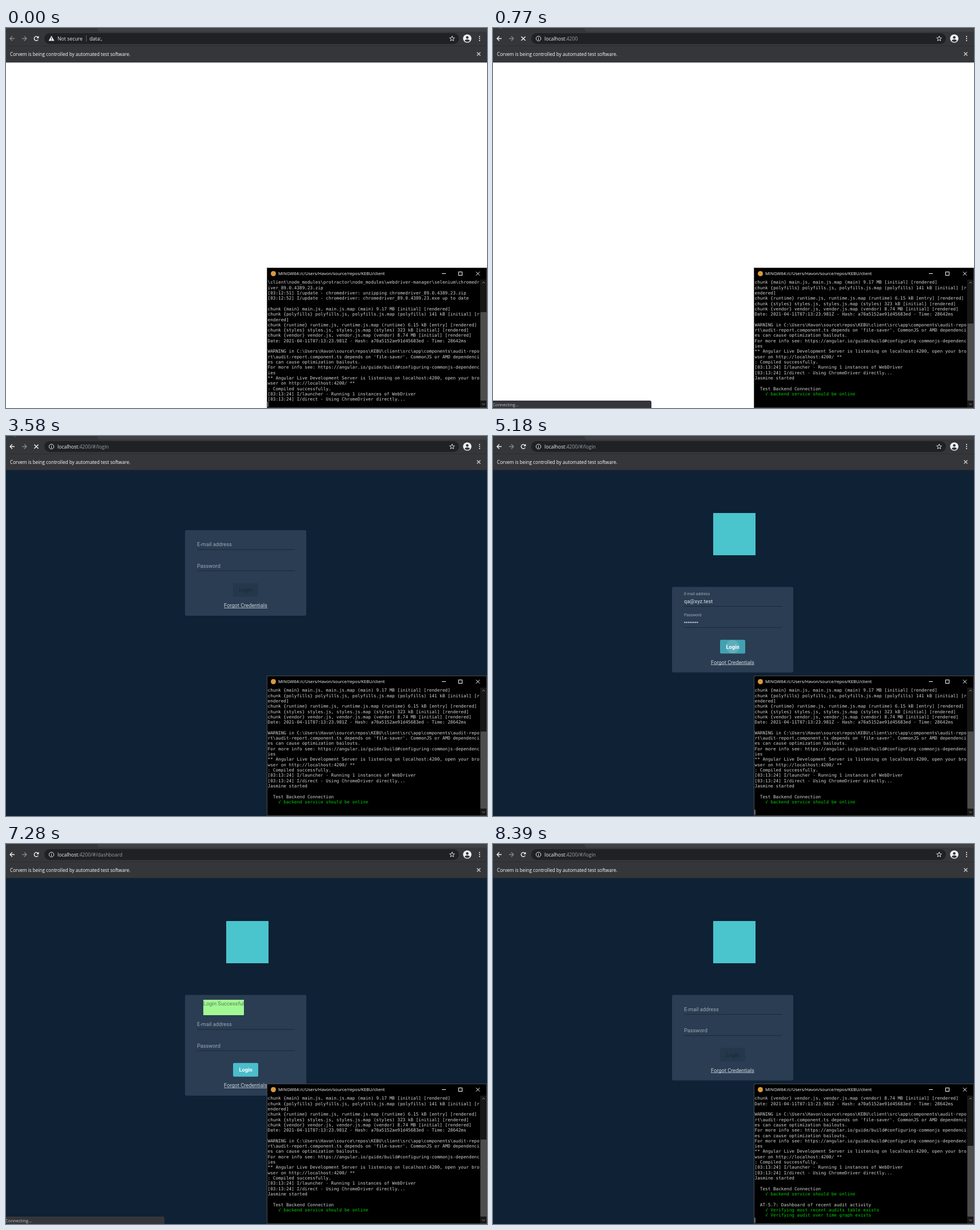
An HTML page with a canvas that plays this animation: 841 by 666 pixels, repeating every 8420 ms.

```html
<!DOCTYPE html>
<html lang="en">
<head>
<meta charset="utf-8">
<title>Automated login test</title>
<style>
html, body { margin: 0; width: 100%; height: 100%; overflow: hidden; background: #fff; }
canvas { display: block; width: 841px; height: 666px; }
</style>
</head>
<body>
<canvas id="stage"></canvas>
<script>
const W = 841, H = 666, LOOP = 8420;
const SANS = '"Open Sans", sans-serif';
const ROBOTO = 'Roboto, sans-serif';
const MONO = '"DejaVu Sans Mono", monospace';
const NAVY = '#0f2135', SLATE = '#2a3d52', BAR = '#35363a', TEAL = '#4bbdcb';

const canvas = document.getElementById('stage');
const dpr = window.devicePixelRatio || 1;
canvas.width = W * dpr;
canvas.height = H * dpr;
const c = canvas.getContext('2d');

const clamp = v => Math.max(0, Math.min(1, v));
const ease = v => { v = clamp(v); return v * v * (3 - 2 * v); };
const ramp = (t, a, b) => clamp((t - a) / (b - a));
const within = (t, ...spans) => spans.some(([a, b]) => t >= a && t < b);

function rect(x, y, w, h, color) {
  c.fillStyle = color;
  c.fillRect(x, y, w, h);
}

function round(x, y, w, h, r, color) {
  c.fillStyle = color;
  c.beginPath();
  c.roundRect(x, y, w, h, r);
  c.fill();
}

function disc(x, y, r, color) {
  c.fillStyle = color;
  c.beginPath();
  c.arc(x, y, r, 0, Math.PI * 2);
  c.fill();
}

// Draws polylines given as [x, y, x, y, ...]
function stroke(color, width, ...lines) {
  c.strokeStyle = color;
  c.lineWidth = width;
  c.beginPath();
  for (const p of lines) {
    c.moveTo(p[0], p[1]);
    for (let i = 2; i < p.length; i += 2) c.lineTo(p[i], p[i + 1]);
  }
  c.stroke();
}

// y is the middle of the capitals
function text(s, x, y, size, color, font = ROBOTO, weight = 400, align = 'left') {
  c.font = `${weight} ${size}px ${font}`;
  c.textAlign = align;
  c.fillStyle = color;
  c.fillText(s, x, y + size * 0.36);
  return c.measureText(s).width;
}

function cross(x, y, r, color, width) {
  stroke(color, width, [x - r, y - r, x + r, y + r], [x + r, y - r, x - r, y + r]);
}

function arrow(x, dir, color) {
  const tip = x + 4 * dir;
  stroke(color, 1.3, [x - 4 * dir, 18.5, tip, 18.5], [x, 14.5, tip, 18.5, x, 22.5]);
}

/* ---------- browser frame ---------- */

function reloadIcon() {
  c.strokeStyle = '#f1f1f1';
  c.lineWidth = 1.4;
  c.beginPath();
  c.arc(53, 18.5, 3.7, 0.5, Math.PI * 1.75);
  c.stroke();
  c.fillStyle = '#f1f1f1';
  c.beginPath();
  c.moveTo(57.4, 13.8);
  c.lineTo(57.4, 18);
  c.lineTo(53.2, 18);
  c.fill();
}

function star(x, y) {
  c.beginPath();
  for (let i = 0; i < 10; i++) {
    const a = -Math.PI / 2 + i * Math.PI / 5, r = i % 2 ? 2 : 4.6;
    c.lineTo(x + r * Math.cos(a), y + r * Math.sin(a));
  }
  c.closePath();
  c.strokeStyle = '#dcdcdc';
  c.lineWidth = 1;
  c.stroke();
}

function avatar(x, y) {
  disc(x, y, 7.3, '#f1f3f4');
  c.save();
  c.beginPath();
  c.arc(x, y, 5.9, 0, 7);
  c.clip();
  disc(x, y - 1.9, 2.3, BAR);
  c.fillStyle = BAR;
  c.beginPath();
  c.ellipse(x, y + 4, 4.4, 2.5, 0, 0, 7);
  c.fill();
  c.restore();
}

function address(t) {
  if (t < 230) {
    c.fillStyle = '#f1f1f1';
    c.beginPath();
    c.moveTo(79.5, 13.6);
    c.lineTo(84.5, 22.6);
    c.lineTo(74.5, 22.6);
    c.fill();
    rect(79, 16.6, 1, 3, '#202124');
    rect(79, 20.4, 1, 1, '#202124');
    text('Not secure', 90, 18.5, 8.7, '#e8eaed', SANS);
    rect(140, 13, 1, 11, '#5f6368');
    text('data:,', 146, 18.5, 8.65, '#f1f3f4', SANS);
    return;
  }
  c.strokeStyle = '#e8eaed';
  c.lineWidth = 1;
  c.beginPath();
  c.arc(79.5, 18.5, 4.2, 0, 7);
  c.stroke();
  rect(79, 16, 1, 1, '#e8eaed');
  rect(79, 18, 1, 3, '#e8eaed');
  const w = text('localhost', 90, 18.5, 8.65, '#f1f3f4', SANS);
  const path = t < 1300 ? '' : within(t, [7200, 8330]) ? '/#/dashboard' : '/#/login';
  text(':4200' + path, 90 + w, 18.5, 8.65, '#9aa0a6', SANS);
}

function browser(t) {
  rect(0, 0, W, 60, BAR);
  c.fillStyle = '#404145';
  c.beginPath();
  c.moveTo(160, 0);
  c.quadraticCurveTo(160, 6.5, 166, 6.5);
  c.lineTo(W, 6.5);
  c.lineTo(W, 0);
  c.fill();
  const loading = within(t, [230, 4530]);
  if (loading) rect(12 + Math.floor(t / 80) % 3, 0, 3, 1, '#6b6d72');

  arrow(11, -1, t < 230 ? '#85878b' : '#f1f1f1');
  arrow(32, 1, '#85878b');
  if (loading) cross(53, 18.5, 3.6, '#f1f1f1', 1.4);
  else reloadIcon();

  round(67, 9, 725, 19, 9.5, '#202124');
  address(t);
  star(780, 18.7);
  avatar(806.5, 18.5);
  for (const y of [15, 18.5, 22]) disc(828, y, 1.05, '#f1f1f1');

  rect(0, 31, W, 1, '#2d2e31');
  text('Corvem is being controlled by automated test software.', 7, 46, 8.16, '#fff', SANS);
  cross(826.5, 45.5, 3, '#dcdcdc', 1.1);
  rect(0, 59, W, 1, '#2b2c2f');
}

function statusBar(alpha) {
  c.globalAlpha = alpha;
  round(-2, 653, 279, 16, 3, BAR);
  text('Connecting...', -1, 660, 7.6, '#c4c6ca', SANS);
  c.globalAlpha = 1;
}

/* ---------- login page ---------- */

const LABEL = '#9ca9b6', RULE = '#17283c';

function field(label, y, up) {
  text(label, 334, y - 13 * up, 9.25 - 2.35 * up, LABEL);
  rect(334, y + 8.5, 171, 1, RULE);
}

function loginButton(t, y, live) {
  if (!live) {
    round(397, y, 44, 24, 2, '#25374b');
    text('Login', 419, y + 12, 9.25, '#1a2b3e', ROBOTO, 500, 'center');
    return;
  }
  round(397, y, 44, 24, 2, TEAL);
  if (within(t, [5120, 5860])) {
    c.save();
    c.beginPath();
    c.roundRect(397, y, 44, 24, 2);
    c.clip();
    const fade = 1 - ramp(t, 5400, 5700);
    rect(397, y, 44, 24, `rgba(30,50,70,${0.2 * fade})`);
    disc(419, y + 12, 8 + 18 * ramp(t, 5120, 5420), `rgba(255,255,255,${0.14 * fade})`);
    c.restore();
  }
  text('Login', 419, y + 12, 9.25, '#fff', ROBOTO, 700, 'center');
}

function loginPage(t) {
  rect(0, 60, W, H - 60, NAVY);
  const logo = t >= 4530;
  const done = within(t, [5860, 8330]);
  const again = t >= 8330;
  const top = logo ? 264.5 : 165;
  const drop = done ? 26.5 : 0;
  if (logo) rect(385, 135, 74, 74, '#4ac4cd');

  round(313, top, 212, 150 + drop, 3, SLATE);
  if (done) {
    c.globalAlpha = ramp(t, 5860, 5980);
    rect(345, 273, 71, 27, '#a2f893');
    text('Login Successful', 345, 279.5, 9.35, '#56805a');
    c.globalAlpha = 1;
  }
  const back = ease(ramp(t, 5900, 6250));
  const emailUp = again ? 0 : ease(ramp(t, 4600, 4760)) * (1 - back);
  const passUp = again ? 0 : ease(ramp(t, 4960, 5090)) * (1 - back);
  const email = top + 25 + drop, pass = email + 37.2;
  field('E-mail address', email, emailUp);
  field('Password', pass, passUp);

  if (within(t, [4700, 5860])) {
    const typed = Math.ceil(11 * ramp(t, 4690, 4820));
    text('qa@xyz.test'.slice(0, typed), 334, email, 9.25, '#dce2e8');
    const dots = Math.round(8 * ramp(t, 4980, 5060));
    for (let i = 0; i < dots; i++) disc(335.4 + i * 3.15, pass, 1.1, '#dce2e8');
  }
  loginButton(t, top + 92.7 + drop, within(t, [5060, 8330]));

  const linkY = top + 132 + drop;
  const w = text('Forgot Credentials', 381, linkY, 9.27, '#ccd4dc');
  rect(381, linkY + 4, w, 0.8, '#ccd4dc');
}

/* ---------- dashboard ---------- */

const HEADS = ['Date Initiated', 'ID', 'Location', 'Bin', 'Initiated By', 'Accuracy', 'Status'];
const HEAD_X = [228, 324, 368, 445, 528, 640, 727];
const CELL_X = [257, 333.5, 389.5, 456.5, 554, 662, 744.5];
const ROWS = [['08', 7, '70%'], ['09', 8, '80%'], ['11', 9, '100%']];
const MENU = ['Dashboard', 'Audits', 'Templates', 'Employees', 'Inventory Items', 'Settings', 'Organization Settings'];

function panel(y, h) {
  round(171.5, y, 643, h + 1.5, 2, '#e2e2e2');
  round(172, y - 0.5, 642, h, 2, '#fff');
}

function sidebar() {
  rect(0, 60, 155, H - 60, NAVY);
  rect(0, 60, 155, 60, SLATE);
  rect(64, 78, 24, 24, '#4ac4cd');
  round(6, 143, 138.5, 26.5, 2, SLATE);
  MENU.forEach((s, i) => text(s, 19, 156 + i * 33.15, 10.65, i ? '#42566b' : '#4fdfd3'));
}

function table() {
  HEADS.forEach((s, i) => text(s, HEAD_X[i], 223, 7.9, '#757575'));
  for (let i = 0; i < 4; i++) rect(183, 241.7 + i * 31.9, 620, 1, '#dedede');
  ROWS.forEach(([day, id, acc], r) => {
    const status = r < 2 ? 'Active' : 'Complete';
    const cells = [day + '/04/2021', id, 'Florida', 'Multiple', 'inventory manager', acc, status];
    cells.forEach((s, i) => {
      const color = s === 'Active' ? '#d9481c' : '#262626';
      text(String(s), CELL_X[i], 257.5 + r * 31.8, 9.2, color, ROBOTO, 400, 'center');
    });
  });
  text('Items per page:', 607, 356.5, 7.9, '#757575');
  text('5', 665, 356.5, 7.9, '#757575');
  text('6 – 8 of 8', 690, 356.5, 7.9, '#757575');
  stroke('#555', 1.3, [760, 352.5, 756, 356.5, 760, 360.5]);
  stroke('#b5b5b5', 1.3, [783, 352.5, 787, 356.5, 783, 360.5]);
}

function dashboard(t) {
  rect(0, 60, W, H - 60, '#fafafa');
  sidebar();
  panel(60, 42.5);
  for (let i = 0; i < 3; i++) rect(190.5, 78 + i * 3.3, 12, 1.4, '#222');
  text('test', 516, 81.5, 13.4, '#222', ROBOTO, 500, 'center');

  panel(120, 279);
  rect(172, 399, 642, 1, '#cfcfcf');
  text('Dashboard', 191.5, 143.5, 13.1, '#2b3440', ROBOTO, 500);
  rect(172, 161, 642, 1, '#e4e4e4');
  text('Most Recent Audits', 189, 183, 9.2, '#1c1c1c', ROBOTO, 700);
  if (t >= 7620) table();

  panel(412.5, 300);
  if (t >= 7700) {
    text('Audit Accuracy over Time', 189, 430.5, 10.1, '#2b2b2b', SANS, 700);
    for (let i = 0; i < 4; i++) {
      const y = 458 + i * 65.9;
      text(String(120 - 20 * i), 206, y, 7.1, '#555', ROBOTO, 400, 'right');
      rect(213, y, 590, 1, '#e4e4e4');
    }
  }
  rect(832, 60, 9, H - 60, '#f1f1f1');
  rect(833, 71, 8, 420, '#c4c4c4');
  c.fillStyle = '#555';
  c.beginPath();
  c.moveTo(834.5, 67.5);
  c.lineTo(839.5, 67.5);
  c.lineTo(837, 64.5);
  c.fill();
}

/* ---------- terminal ---------- */

const LOG = String.raw`\client\node_modules\protractor\node_modules\webdriver-manager\selenium\chromedr
iver_89.0.4389.23.zip
[03:12:51] I/update - chromedriver: unzipping chromedriver_89.0.4389.23.zip
[03:12:52] I/update - chromedriver: chromedriver_89.0.4389.23.exe up to date

chunk {main} main.js, main.js.map (main) 9.17 MB [initial] [rendered]
chunk {polyfills} polyfills.js, polyfills.js.map (polyfills) 141 kB [initial] [r
endered]
chunk {runtime} runtime.js, runtime.js.map (runtime) 6.15 kB [entry] [rendered]
chunk {styles} styles.js, styles.js.map (styles) 323 kB [initial] [rendered]
chunk {vendor} vendor.js, vendor.js.map (vendor) 8.74 MB [initial] [rendered]
Date: 2021-04-11T07:13:23.981Z - Hash: a70a5152ae91d45683ed - Time: 28642ms

WARNING in C:\Users\Havon\source\repos\KEBU\client\src\app\components\audit-repo
rt\audit-report.component.ts depends on 'file-saver'. CommonJS or AMD dependenci
es can cause optimization bailouts.
For more info see: https://angular.io/guide/build#configuring-commonjs-dependenc
ies
** Angular Live Development Server is listening on localhost:4200, open your bro
wser on http://localhost:4200/ **
: Compiled successfully.
[03:13:24] I/launcher - Running 1 instances of WebDriver
[03:13:24] I/direct - Using ChromeDriver directly...
Jasmine started

  Test Backend Connection
    √ backend service should be online

  AT-5.7: Dashboard of recent audit activity
    √ Verifying most recent audits table exists
    √ Verifying audit over time graph exists`.split('\n');

// Lines repeated by the console when it reflows
const REFLOW = [
  'For more info see: https://angular.io/guide/build#configuring-commonjs ependenci',
  'es can cause optimization bailouts.'
];
const cut = LOG.findIndex(s => s.startsWith('For more'));
const LOG_LATE = [...LOG.slice(0, cut), ...REFLOW, ...LOG.slice(cut)];

function printed(t) {
  if (t < 290) return 23;
  if (t < 670) return 24;
  if (t < 8090) return 28;
  return t < 8330 ? 32 : 33;
}

function terminal(t) {
  rect(456, 420, 385, 246, '#4a4a4a');
  rect(457, 421, 383, 244, '#000');
  disc(467.5, 430.5, 4.5, '#d99a3e');
  text('MINGW64:/c/Users/Havon/source/repos/KEBU/client', 476, 430.5, 7.6, '#fff', SANS);
  rect(762, 430, 7, 1, '#fff');
  c.strokeStyle = '#fff';
  c.lineWidth = 1;
  c.strokeRect(791.5, 427.5, 6, 6);
  cross(825, 430.5, 3.2, '#fff', 1);

  const n = printed(t);
  const lines = n > 28 ? LOG_LATE : LOG;
  lines.slice(n - 23, n).forEach((s, i) => {
    const color = s.includes('√') ? '#00d200' : '#d4d4d4';
    text(s, 457.5, 445.5 + i * 9.32, 7.7, color, MONO);
  });
  const blink = within(t, [0, 260], [1340, 2400], [2950, 3500], [4230, 4700],
    [5000, 5560], [6650, 7240], [8110, LOOP]);
  if (blink) rect(457.5, 655, 1, 9, '#c3c3c3');

  const thumb = n < 25 ? 498 : n < 30 ? 518 : 529;
  rect(829, 441, 11, 224, '#171717');
  rect(829.5, thumb, 10.5, 653 - thumb, '#4d4d4d');
  stroke('#8a8a8a', 1, [832.5, 447.5, 835, 445, 837.5, 447.5], [832.5, 658, 835, 660.5, 837.5, 658]);
}

/* ---------- timeline ---------- */

function draw(t) {
  c.setTransform(dpr, 0, 0, dpr, 0, 0);
  rect(0, 0, W, H, '#fff');
  if (within(t, [7490, 8350])) dashboard(t);
  else if (t >= 1760) loginPage(t);
  browser(t);
  if (t < 1760) {
    rect(0, 60, W, 1, '#a9a9ab');
    rect(0, 61, W, 1, '#e6e6e6');
  }
  if (within(t, [630, 1200])) statusBar(ramp(t, 600, 720) * (1 - ramp(t, 1060, 1200)));
  if (within(t, [7280, 7490])) statusBar(1);
  terminal(t);
}

function tick() {
  draw(performance.now() % LOOP);
  requestAnimationFrame(tick);
}
tick();
</script>
</body>
</html>
```
